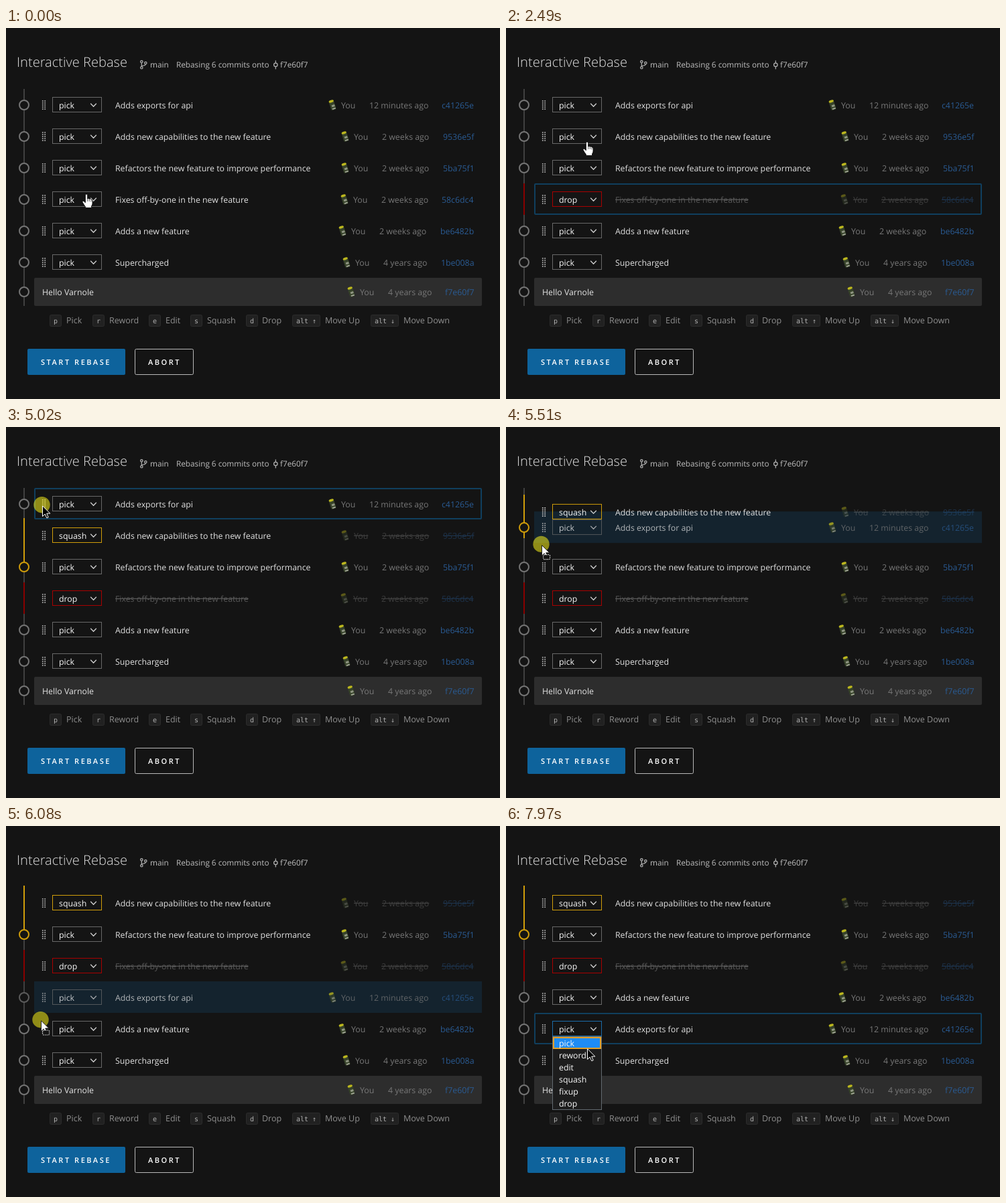
An HTML page that plays this animation: 737 by 554 pixels, repeating every 8 s.

```html
<!DOCTYPE html>
<html lang="en">
<head>
<meta charset="utf-8">
<title>Interactive Rebase</title>
<style>
html, body { margin: 0; width: 100%; height: 100%; overflow: hidden; background: #141414; }
svg { display: block; width: 737px; height: 554px; }
text { font: 12.34px "Open Sans", "Noto Sans", sans-serif; fill: #e2e2e2; text-rendering: geometricPrecision; }
.title { font-size: 20.1px; font-weight: 350; fill: #dedede; }
.sub { font-size: 11.75px; fill: #bebebe; }
.meta { fill: #787878; }
.hash { fill: #2a5b93; }
.label { font-size: 12.5px; fill: #909090; }
.white { fill: #f8f8f8; }
.key { font: 10px "DejaVu Sans Mono", "Liberation Mono", monospace; fill: #b0b0b0; text-anchor: middle; }
.button { font-size: 11px; font-weight: 600; letter-spacing: 2.53px; fill: #fff; }
.line { fill: none; stroke: #b4b4b4; stroke-width: 1.2; }
.node { fill: #141414; stroke: #757575; stroke-width: 2; }
.struck text { text-decoration: line-through; }
</style>
</head>
<body>
<svg viewBox="0 0 737 554" id="stage"></svg>
<script>
const LOOP = 8000, TOP = 115, STEP = 47;
const GOLD = '#d09d0a', RED = '#a80000';
const stage = document.getElementById('stage');

function el(parent, tag, attrs = {}, content = '') {
  const node = document.createElementNS('http://www.w3.org/2000/svg', tag);
  set(node, attrs);
  node.textContent = content;
  parent.append(node);
  return node;
}
function set(node, attrs) {
  for (const name in attrs) node.setAttribute(name, attrs[name]);
}
const group = parent => el(parent, 'g');
const rect = (parent, x, y, width, height, more) => el(parent, 'rect', { x, y, width, height, ...more });
const path = (parent, d, more) => el(parent, 'path', { d, ...more });
const label = (parent, x, y, content, cls = '') => el(parent, 'text', { x, y, class: cls }, content);
const show = (node, on) => node.setAttribute('visibility', on ? 'visible' : 'hidden');
const move = (node, x, y) => node.setAttribute('transform', `translate(${x} ${y})`);

const clamp = v => Math.max(0, Math.min(1, v));
const smooth = v => v * v * (3 - 2 * v);
const progress = (t, start, length) => clamp((t - start) / length);
const spanAt = (t, spans) => spans.find(([a, b]) => t >= a && t < b);

// Header
label(stage, 16, 58, 'Interactive Rebase', 'title');
const icons = el(stage, 'g', { class: 'line' });
for (const [cx, cy] of [[202.3, 50.3], [202.3, 59.3], [208.3, 52.3]])
  el(icons, 'circle', { cx, cy, r: 1.7 });
path(icons, 'M202.3 52V57.6M208.3 54Q208.3 56.3 202.3 56.5');
el(icons, 'circle', { cx: 402.3, cy: 55, r: 2.7 });
path(icons, 'M402.3 48.5V52.3M402.3 57.7V61.5');
label(stage, 215, 59, 'main', 'sub');
label(stage, 254, 59, 'Rebasing 6 commits onto', 'sub');
label(stage, 409, 59, 'f7e60f7', 'sub');

// Footer
const keys = [
  ['p', 65, 17, 'Pick', 90], ['r', 129, 17, 'Reword', 154], ['e', 213, 17, 'Edit', 238],
  ['s', 275, 17, 'Squash', 300], ['d', 358, 17, 'Drop', 382],
  ['alt ↑', 427, 41, 'Move Up', 476], ['alt ↓', 544, 41, 'Move Down', 593]
];
for (const [key, x, w, name, nameX] of keys) {
  rect(stage, x + .5, 428.5, w, 17, { rx: 2, fill: '#212121', stroke: '#2c2c2c' });
  label(stage, x + .5 + w / 2, 440.5, key, 'key');
  label(stage, nameX, 441, name, 'label');
}
rect(stage, 32, 479, 146, 39, { rx: 2, fill: '#0e639c' });
label(stage, 52, 503, 'START REBASE', 'button');
rect(stage, 192.5, 479.5, 87, 38, { rx: 2, fill: 'none', stroke: '#b8b8b8' });
label(stage, 212, 503, 'ABORT', 'button');

// Commit list, stacked in layers shared by all rows
const [backs, lines, nodes, fronts] = Array.from({ length: 4 }, () => group(stage));
path(lines, 'M27 91V415', { stroke: '#404040', 'stroke-width': 2 });

function drawMeta(parent, youX, date, hashX, hash) {
  const avatar = el(parent, 'g', { transform: `translate(${youX - 13} 0) rotate(-18)` });
  rect(avatar, -3.8, -6, 7.6, 13.5, { rx: 2, fill: '#37432a' });
  rect(avatar, -1.5, 0, 4.5, 3, { fill: '#8f9582' });
  rect(avatar, -2, 5, 5, 1.8, { fill: '#a5a99b' });
  el(avatar, 'ellipse', { cx: 0, cy: -5.8, rx: 3.7, ry: 1.9, fill: '#bdb81e' });
  label(parent, youX, 4.7, 'You', 'meta');
  label(parent, youX + 42, 4.7, date, 'meta');
  label(parent, hashX, 4.7, hash, 'hash');
}

const rows = [
  ['Adds exports for api', 500, '12 minutes ago', 650, 'c41265e'],
  ['Adds new capabilities to the new feature', 519, '2 weeks ago', 652, '9536e5f'],
  ['Refactors the new feature to improve performance', 519, '2 weeks ago', 652, '5ba75f1'],
  ['Fixes off-by-one in the new feature', 518, '2 weeks ago', 650, '58c6dc4'],
  ['Adds a new feature', 515, '2 weeks ago', 648, 'be6482b'],
  ['Supercharged', 521, '4 years ago', 649, '1be008a']
].map(([message, ...details]) => {
  const row = { back: group(backs), line: group(lines), node: group(nodes), front: group(fronts) };
  row.fill = rect(row.back, 42, -24, 668, 47, { fill: '#14232e' });
  row.focus = rect(row.back, 43, -23, 666, 45, { rx: 1, fill: 'none', stroke: '#103f5e', 'stroke-width': 2 });
  row.stroke = path(row.line, '', { 'stroke-width': 2 });
  row.circle = el(row.node, 'circle', { cx: 27, r: 7, class: 'node' });
  path(row.front, 'M54.8 -6.8V6.8M58.2 -6.8V6.8', { stroke: '#c0c0c0', 'stroke-width': 1.8, 'stroke-dasharray': '1.6 1.4' });
  row.select = rect(row.front, 69.5, -11.5, 73, 22, { fill: 'none' });
  row.action = label(row.front, 79, 4.7, 'pick', 'white');
  path(row.front, 'M126.2 -2.2L130.5 2.2L134.8 -2.2', { fill: 'none', stroke: '#cfcfcf', 'stroke-width': 1.3 });
  row.message = group(row.front);
  label(row.message, 163, 4.7, message);
  row.meta = group(row.front);
  drawMeta(row.meta, ...details);
  return row;
});

rect(backs, 42, 373, 668, 42, { rx: 2, fill: '#2d2d2d' });
el(nodes, 'circle', { cx: 27, cy: 394, r: 7, class: 'node' });
const base = el(fronts, 'g', { transform: 'translate(0 394)' });
label(base, 54, 4.7, 'Hello Varnole');
drawMeta(base, 528, '4 years ago', 655, 'f7e60f7');

// Dropdown
const menu = group(stage);
rect(menu, 69.5, 11.5, 73, 109, { fill: '#1d1d1d', stroke: '#626a70' });
const marker = rect(menu, 71, 13, 70, 16, { fill: '#1e8cf5', stroke: '#e2a02a', 'stroke-width': 2 });
['pick', 'reword', 'edit', 'squash', 'fixup', 'drop'].forEach((name, i) =>
  label(menu, 79, 25.5 + 18 * i, name, 'white'));

// Pointer
const pointer = group(stage);
const press = el(pointer, 'circle', { cx: -.5, cy: -.8, r: 12.2, fill: '#fff81a', 'fill-opacity': .53 });
const arrow = path(pointer, 'M.5 .8V16.5L4.2 13L6.8 18.8L9.2 17.8L6.7 12.1H11.8Z');
const hand = group(pointer);
path(hand, 'M-1.6 1Q0 -1 1.6 1V7Q3.2 5.8 4.2 7.4Q6 6.2 7 8.2Q9 7.4 9 10V14Q9 16 7.5 18V20.5H-1.5V19' +
  'Q-4 15.5 -6 12Q-6.3 9.5 -4 10.5L-1.6 12.8Z', { fill: '#fff', stroke: '#000', 'stroke-width': .8 });
path(hand, 'M1.7 7V11M4.3 8V11M6.9 9V11.5', { stroke: '#333', 'stroke-width': .8 });
const ghost = rect(pointer, 2.6, 15, 10, 7, { rx: 1.5, fill: '#141414', stroke: '#ddd', 'stroke-width': 1.2, 'stroke-dasharray': '1.6 1.1' });

// Timeline
const DROP_AT = 1270, SQUASH_AT = 3810, DRAG = [5270, 6750];
const swaps = [0, 5417, 5600, 5850, 6085];
const presses = [[300, 430], [1120, 1270], [2520, 2650], [3640, 3810], [4830, 6750], [7300, 7430]];
const menus = [[300, DROP_AT, 3], [2520, SQUASH_AT, 1], [7300, LOOP, 0]];
const focuses = [[300, 2520, 3], [2520, 4830, 1], [4830, DRAG[0], 0], [DRAG[1], LOOP, 0]];

// time, x, y, and 1 where the pointer arrives at a steady pace
const route = [
  [0, 120, 248], [450, 120, 248], [1090, 104, 366], [1710, 104, 366], [2490, 121, 170],
  [2680, 121, 170], [3320, 110, 231], [3410, 110, 231], [3500, 110, 241], [3990, 110, 241],
  [4600, 68, 129, 1], [4800, 54, 117], [5270, 54, 117], [5510, 53, 175.5, 1], [5790, 52, 236, 1],
  [5980, 52, 289, 1], [6080, 52, 290], [6380, 52, 292], [6840, 52, 292], [7250, 116, 301],
  [7580, 116, 301], [7970, 121, 332], [LOOP, 121, 332]
];

function pointerAt(t) {
  const i = route.findIndex(stop => stop[0] > t);
  const [t0, x0, y0] = route[i - 1], [t1, x1, y1, steady] = route[i];
  const p = (t - t0) / (t1 - t0), k = steady ? p : smooth(p);
  return [x0 + (x1 - x0) * k, y0 + (y1 - y0) * k];
}

// The commit below the squashed one, which receives it
function goldRow(t) {
  if (t < SQUASH_AT) return -1;
  return t >= swaps[1] && t < swaps[2] ? 0 : 2;
}

function render(t) {
  const moved = swaps.map((start, i) => i ? smooth(progress(t, start, 140)) : 0);
  const total = moved.reduce((a, b) => a + b);
  const ys = rows.map((_, i) => TOP + STEP * (i ? i - (moved[i] || 0) : total));
  const open = spanAt(t, menus), focus = spanAt(t, focuses);
  const dragging = spanAt(t, [DRAG]);
  const gold = goldRow(t);

  rows.forEach((row, i) => {
    const dropped = i === 3 && t >= DROP_AT, squashed = i === 1 && t >= SQUASH_AT;
    const held = i === 0 && dragging;
    const dim = dropped ? progress(t, DROP_AT, 200) : squashed ? progress(t, SQUASH_AT, 120) : 0;
    const struck = dropped || squashed;
    for (const part of [row.back, row.line, row.node, row.front]) move(part, 0, ys[i]);
    show(row.fill, held);
    show(row.focus, focus && focus[2] === i);
    set(row.stroke, squashed ? { d: 'M27 -26V39', stroke: GOLD }
      : { d: dropped ? 'M27 -24V23' : '', stroke: '#8a0000' });
    show(row.circle, !struck);
    row.circle.style.stroke = i === gold ? GOLD : held ? '#5c5c5c' : '';
    row.front.setAttribute('opacity', held ? .76 : 1);
    const opened = open && open[2] === i;
    row.select.setAttribute('stroke', dropped ? RED : squashed ? GOLD : opened ? '#1b6ca8' : '#686868');
    row.action.textContent = dropped ? 'drop' : squashed ? 'squash' : 'pick';
    set(row.message, { opacity: dropped ? 1 - .68 * dim : 1, class: dropped ? 'struck' : '' });
    set(row.meta, { opacity: 1 - .58 * dim, class: struck ? 'struck' : '' });
  });

  const [x, y] = pointerAt(t);
  show(menu, open);
  if (open) {
    const menuY = ys[open[2]];
    move(menu, 0, menuY);
    const item = Math.max(0, Math.min(5, Math.round((y - menuY - 21) / 18)));
    marker.setAttribute('y', 13 + 18 * item);
  }

  const overMenu = open && y > ys[open[2]] + 11.5;
  const overSelect = !dragging && !overMenu && x > 69 && x < 143 && ys.some(cy => Math.abs(y - cy) < 11.5);
  move(pointer, x, y);
  show(press, spanAt(t, presses));
  show(hand, overSelect);
  show(arrow, !overSelect);
  set(arrow, dragging ? { fill: '#fff', stroke: '#222' } : { fill: '#000', stroke: '#fff' });
  show(ghost, dragging);
}

function tick() {
  render(performance.now() % LOOP);
  requestAnimationFrame(tick);
}
tick();
</script>
</body>
</html>
```
